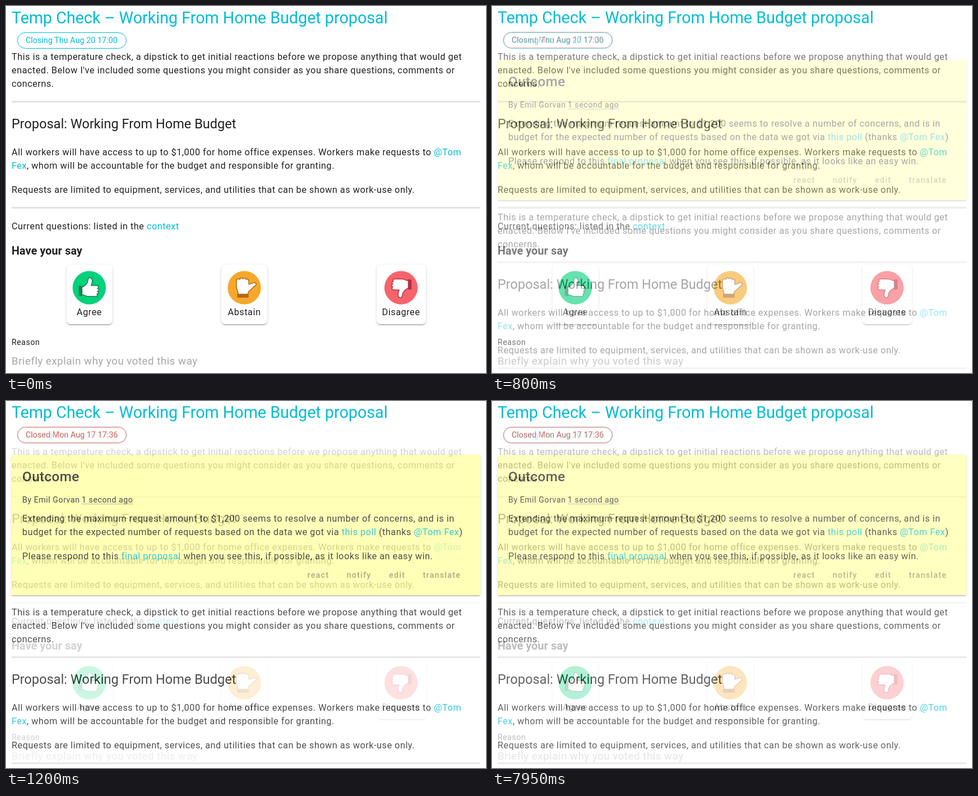
These frames come from a looping animation (856 by 654 pixels, 8 s). An HTML page:

```html
<!DOCTYPE html>
<html lang="en">
<head>
<meta charset="utf-8">
<title>Budget proposal</title>
<style>
html, body { margin: 0; width: 100%; height: 100%; overflow: hidden; background: #fff; }
.page { position: absolute; left: 0; top: 0; width: 856px; height: 654px; overflow: hidden; background: #fff; }
.page > * { position: absolute; box-sizing: border-box; }
svg { left: 0; top: 0; }
text { font: 400 16.27px Roboto, sans-serif; letter-spacing: .518px; fill: #212121; white-space: pre; }
.title { font-size: 28.7px; letter-spacing: 0; fill: #00bcd4; }
.head { font-size: 23.55px; letter-spacing: 0; }
.outcome { font-size: 24.4px; font-weight: 500; letter-spacing: .3px; }
.say { font-size: 19.8px; font-weight: 700; letter-spacing: .1px; }
.chip { font-size: 14.4px; letter-spacing: 0; fill: #00bcd4; }
.small { font-size: 14.24px; }
.hint { font-size: 18.7px; fill: #a6a6a6; }
.act { font-size: 14.24px; font-weight: 500; letter-spacing: 1.27px; fill: #97975f; }
.mid { text-anchor: middle; }
.red { fill: #f44336; }
.link { fill: #00bcd4; }
.pill { width: 195px; height: 29px; left: 19.5px; border: 1.5px solid #00bcd4; border-radius: 15px; }
.pill.closed { border-color: #f44336; }
.rule { left: 10px; width: 836px; height: 2.5px; background: #e2e2e2; }
.card { top: 461px; height: 106px; border-radius: 7px; background: #fff; }
.note { left: 10px; top: 96px; width: 836px; height: 249.5px; border-radius: 2px; background: #ffffa5; }
.card, .note { box-shadow: 0 3px 1px -2px #0003, 0 2px 2px #00000024, 0 1px 5px #0000001f; }
</style>
</head>
<body>
<div class="page" id="open"></div>
<div class="page" id="closed"></div>
<script>
const PERSON = ["@Tom", "Fex"];
const link = s => `<tspan class="link">${s}</tspan>`;
const text = (x, y, s, cls = "") => `<text x="${x}" y="${y}" class="${cls}">${s}</text>`;
const rule = y => `<div class="rule" style="top:${y}px"></div>`;
const svg = s => `<svg width="856" height="654">${s}</svg>`;

const header = (y, label, cls) =>
  text(10, y, "Temp Check – Working From Home Budget proposal", "title") +
  text(35, y + 35.3, label, "chip " + cls);

// Shared proposal text; y is the first baseline.
const proposal = y =>
  text(10, y, "This is a temperature check, a dipstick to get initial reactions before we propose anything that would get") +
  text(10, y + 24, "enacted. Below I've included some questions you might consider as you share questions, comments or") +
  text(10, y + 48, "concerns.") +
  text(10, y + 122, "Proposal: Working From Home Budget", "head") +
  text(10, y + 170, "All workers will have access to up to $1,000 for home office expenses. Workers make requests to " + link(PERSON[0])) +
  text(10, y + 194, link(PERSON[1]) + ", whom will be accountable for the budget and responsible for granting.") +
  text(10, y + 237, "Requests are limited to equipment, services, and utilities that can be shown as work-use only.");

// Each hand is a cuff and a fist, centred on its disc.
const THUMB = ["M-18-2.5H-13V14H-18Z",
  "M-13-1C-9-2-5-6-3-10C-2-13-3-18 1-18C5-18 6-13 5-9L3.5-4H13" +
  "C17-4 17 1 14.5 1.5C18 2 17.5 6 14.5 6.5C17 7 16.5 11 13.5 11.2C15.5 12 14.5 15.5 11.5 15.5H-2C-6 15.5-8 13-13 12.5Z"];
const SIDE = ["M-12 11.5H7V17H-12Z",
  "M-11 11.5C-11 6-14 3-14-2V-12C-14-16-9-17-8-14.5C-8-18-3-18.5-2.5-15.5C-2-18 3-18 3-14.5" +
  "C4-16.5 8-15.5 8-12V-6C12-6 15-9 18-9C22-9 22-5 19-3C14 0 12 4 8.5 6C7 7 6.5 9 6.5 11.5Z"];
const hand = (x, fill, dark, [cuff, fist], turn) =>
  `<g transform="translate(${x} 502)"><circle r="29.7" fill="${fill}"/>
  <g transform="rotate(${turn})" stroke="${dark}" stroke-width="1.5" stroke-linejoin="round">
  <path d="${cuff}" fill="${dark}"/><path d="${fist}" fill="#fff"/></g></g>`;

// name, card left, card width, centre, fill, dark tone, hand, turn
const VOTES = [
  ["Agree", 107.5, 82, 148.5, "#00d17a", "#167f51", THUMB, 0],
  ["Abstain", 384, 82, 425, "#f6a82b", "#b06a16", SIDE, 0],
  ["Disagree", 661, 87.5, 704.5, "#f7636b", "#b33244", THUMB, 180]
];
const ACTIONS = [["react", 537.5], ["notify", 607.5], ["edit", 683], ["translate", 743.5]];

document.getElementById("open").innerHTML =
  `<div class="pill" style="top:47px"></div>` + rule(169) + rule(358) +
  VOTES.map(v => `<div class="card" style="left:${v[1]}px;width:${v[2]}px"></div>`).join("") +
  svg(header(31, "Closing Thu Aug 20 17:00", "") + proposal(96) +
    text(10, 398, "Current questions: listed in the " + link("context")) +
    text(10, 442.5, "Have your say", "say") +
    VOTES.map(([name, , , x, ...look]) => hand(x, ...look) + text(x, 551, name, "mid")).join("") +
    text(10, 604, "Reason", "small") +
    text(10, 638.5, "Briefly explain why you voted this way", "hint"));

document.getElementById("closed").innerHTML =
  `<div class="pill closed" style="top:46px"></div><div class="note"></div>` + rule(455) + rule(644) +
  svg(header(30, "Closed Mon Aug 17 17:36", "red") +
    text(29, 143, "Outcome", "outcome") +
    text(29, 181, "By Emil Gorvan", "small") + text(135, 181, "1 second ago", "small") +
    `<path d="M135.5 183.5H227" stroke="#55553a" stroke-dasharray="1 1"/>` +
    text(29, 215, "Extending the maximum request amount to $1,200 seems to resolve a number of concerns, and is in") +
    text(29, 239, `budget for the expected number of requests based on the data we got via ${link("this poll")} (thanks ${link(PERSON.join(" "))})`) +
    text(29, 282, `Please respond to this ${link("final proposal")} when you see this, if possible, as it looks like an easy win.`) +
    ACTIONS.map(([s, x]) => text(x, 315, s, "act")).join("") +
    proposal(382.3));

// Cross-fade in tenths: in from 500 ms, back out from 7750 ms.
const LOOP = 8000;
const steps = [[0, 0]];
for (let i = 1; i <= 10; i++) steps.push([400 + i * 100, i / 10]);
for (let i = 1; i <= 3; i++) steps.push([7650 + i * 100, 1 - i / 10]);
steps.push([LOOP, .7]);
document.getElementById("closed").animate(
  steps.map(([t, opacity]) => ({ offset: t / LOOP, opacity, easing: "step-end" })),
  { duration: LOOP, iterations: Infinity });
</script>
</body>
</html>
```
